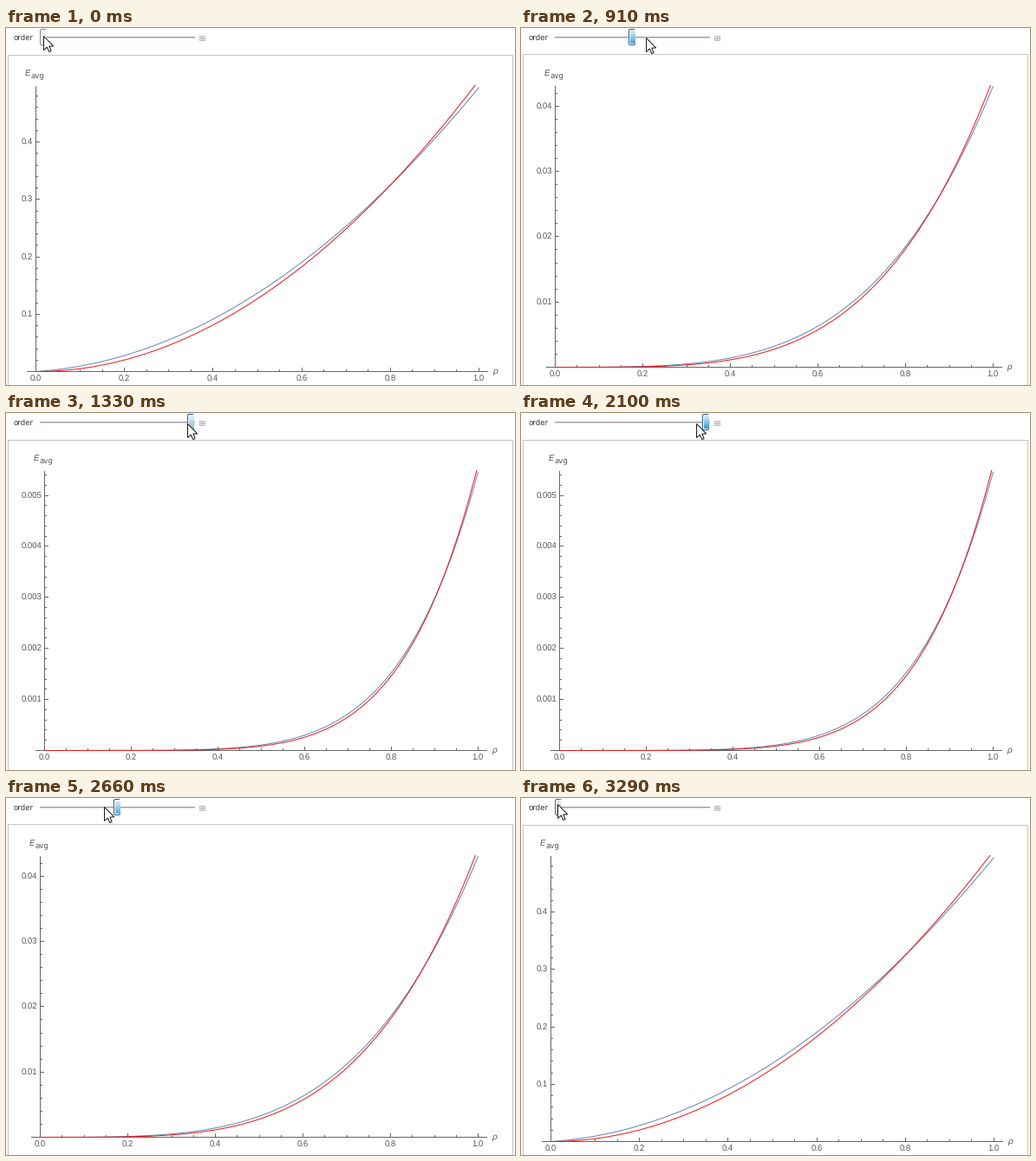
A matplotlib script that plays this animation: 587x412 px, repeating every 3.36 s.

```python
import numpy as np
import matplotlib.pyplot as plt
from matplotlib.animation import FuncAnimation
from matplotlib.patches import FancyBboxPatch, Polygon, Rectangle

# Coordinates are pixel centres already, so no snapping is wanted
plt.rcParams["path.snap"] = False
plt.rcParams["text.hinting"] = "none"

W, H, DPI = 587, 412, 72          # at 72 dpi one point is one pixel
FRAMES, INTERVAL = 48, 70
INK, LABEL = "#666666", "#555555"
BLUE, RED = "#6485b8", "#f01616"
TOP = 66                          # upper edge of the plot range

# Per order: left x, right x, base y, pixels per unit, major step, minor ticks
# per step, decimals, blue = a r^n + b r^(n+1), red = c r^(n+1), panel top
ORDERS = [
    dict(x0=34, x1=545, y0=396, scale=662, step=0.1, minor=5, digits=1,
         a=0.051, b=0.4445, c=0.508, panel=31),
    dict(x0=39, x1=544, y0=391, scale=2350, step=0.02, minor=4, digits=2,
         a=0.0213, b=0.1163, c=0.1413, panel=30),
    dict(x0=39, x1=544, y0=391, scale=7530, step=0.01, minor=5, digits=2,
         a=0.0083, b=0.0348, c=0.0443, panel=30),
    dict(x0=44, x1=544, y0=389, scale=21750, step=0.002, minor=4, digits=3,
         a=0.0034, b=0.0114, c=0.01518, panel=31),
    dict(x0=44, x1=544, y0=389, scale=58900, step=0.001, minor=5, digits=3,
         a=0.0015, b=0.00396, c=0.00560, panel=31),
]

fig = plt.figure(figsize=((W + 1e-4) / DPI, (H + 1e-4) / DPI), dpi=DPI,
                 facecolor="white")
ax = fig.add_axes([0, 0, 1, 1])
ax.axis("off")


def line(xs, ys, color=INK, lw=1.0, z=2):
    return ax.plot(xs, ys, color=color, lw=lw, zorder=z,
                   solid_capstyle="butt")[0]


def text(x, y, s, size=9.5, ha="left", color=LABEL, style="normal",
         family="Liberation Sans"):
    return ax.text(x, y, s, fontsize=size, ha=ha, va="baseline", color=color,
                   family=family, style=style, zorder=4)


def px(v):
    """Centre of the pixel nearest to v."""
    return np.floor(v + 0.5) + 0.5


def build_plot(n, o):
    """All artists of the plot for one order."""
    x0, x1, y0, k = o["x0"], o["x1"], o["y0"], o["scale"]
    base, left = y0 + 0.5, x0 + 0.5
    parts = [
        ax.add_patch(Rectangle((2.5, o["panel"] + 0.5), 582, H, fill=False,
                               ec="#c4c4c4", lw=1, zorder=1)),
        line([x0 - 10, x1 + 11], [base, base]),
        line([left, left], [67, y0 + 1]),
        text(x0 - 12, 55, "E", style="italic"),
        text(x0 - 6, 57.5, "avg", size=8.6, family="DejaVu Sans"),
        text(x1 + 16.5, y0 + 2.5, "ρ", size=10, style="italic"),
    ]
    for i in range(21):
        x = px(x0 + (x1 - x0) * i / 20)
        major = i % 4 == 0
        parts.append(line([x, x], [y0, y0 - (4 if major else 2)]))
        if major:
            parts.append(text(x - 0.5, y0 + 11.5, f"{i / 20:.1f}",
                              ha="center"))
    count = int((y0 - 67) / (k * o["step"] / o["minor"]))
    for i in range(1, count + 1):
        value = i * o["step"] / o["minor"]
        y = px(y0 - k * value)
        major = i % o["minor"] == 0
        parts.append(line([x0, x0 + (5 if major else 3)], [y, y]))
        if major:
            parts.append(text(x0 - 3, y + 3, f"{value:.{o['digits']}f}",
                              ha="right"))

    r = np.linspace(0, 1, 160)
    xs = left + (x1 - x0) * r
    blue = o["a"] * r ** n + o["b"] * r ** (n + 1)
    red = o["c"] * r ** (n + 1)
    window = Rectangle((0, TOP), W, H, transform=ax.transData)
    for values, color, z in ((blue, BLUE, 2.5), (red, RED, 2.6)):
        curve = line(xs, base - k * values, color, 1.0, z)
        curve.set_clip_path(window)
        parts.append(curve)
    return parts


plots = [build_plot(n, o) for n, o in enumerate(ORDERS, 1)]

# Slider track, label and the small expand box
text(9, 14.3, "order", size=8.6, color="#333333", family="DejaVu Sans")
line([39, 218], [10.5, 10.5], "#a5969d")
line([39, 218], [11.5, 11.5], "#d9d0d4")
ax.add_patch(Rectangle((223.5, 9.5), 6, 5, fc="#eeeef4", ec="#bcbcca", lw=1))
line([224, 229], [12, 12], "#b4b4c2")
line([226.5, 226.5], [10, 14], "#b4b4c2")

# Slider handle: rounded white case with a shaded body
case = ax.add_patch(FancyBboxPatch((0, 1.5), 7, 18, fc="white", lw=1, zorder=5,
                                   boxstyle="round,pad=0,rounding_size=1.6"))
body = ax.imshow(np.ones((16, 1, 3)), extent=(0, 1, 18, 3), aspect="auto",
                 interpolation="nearest", zorder=6)

ARROW = np.array([(0, 0), (0, 16), (3.8, 12.6), (6.2, 18), (8.6, 17),
                  (6.3, 11.6), (11.2, 11.4)])
cursor = ax.add_patch(Polygon(ARROW, closed=True, fc="white", ec="#1a1a1a",
                              lw=1, joinstyle="miter", zorder=9))
ax.set_xlim(0, W)
ax.set_ylim(H, 0)

# Pointer path: drag right, rest, drag back
KEYS = [0, 2, 4, 7, 13, 19, 29, 30, 38, 43, 45, 47]
TIP_X = [44.5, 46, 54, 79, 145, 210.5, 210.5, 203.5, 114, 64, 52, 43.5]
TIP_Y = [10, 9.5, 9, 9, 12, 13, 13, 12.5, 10.5, 9, 8.5, 8]
# Strength of the handle's highlight
GLOW_KEYS = [0, 2, 7, 13, 19, 23, 25, 30, 38, 45, 47]
GLOW = [0.0, 0.6, 0.85, 0.9, 0.5, 0.5, 1.0, 1.0, 0.75, 0.6, 0.3]


def mix(a, b, t):
    return np.array(a) + (np.array(b) - np.array(a)) * t


def draw_handle(x, glow):
    top = mix((0.97, 0.97, 0.98), (0.87, 0.95, 0.99), glow)
    bottom = mix((0.86, 0.87, 0.90), (0.25, 0.60, 0.80), glow)
    ramp = np.linspace(0, 1, 16)[:, None, None]
    body.set_data(np.clip(top + (bottom - top) * ramp, 0, 1))
    body.set_extent((x - 2, x + 3, 18, 3))
    case.set_x(x - 3.5)
    case.set_edgecolor(mix((0.50, 0.52, 0.58), (0.16, 0.37, 0.52),
                           min(1, glow * 2)))


def update(i):
    x, y = np.interp(i, KEYS, TIP_X), np.interp(i, KEYS, TIP_Y)
    order = int(np.clip(round((x - 43) / 42.5), 0, 4))
    for k, parts in enumerate(plots):
        for part in parts:
            part.set_visible(k == order)
    draw_handle(43 + np.floor(42.5 * order), np.interp(i, GLOW_KEYS, GLOW))
    cursor.set_xy(ARROW + (px(x - 1.5), px(y - 1)))
    return []


update(0)
anim = FuncAnimation(fig, update, frames=FRAMES, interval=INTERVAL,
                     repeat=True, repeat_delay=0, blit=False)
plt.show()
```
